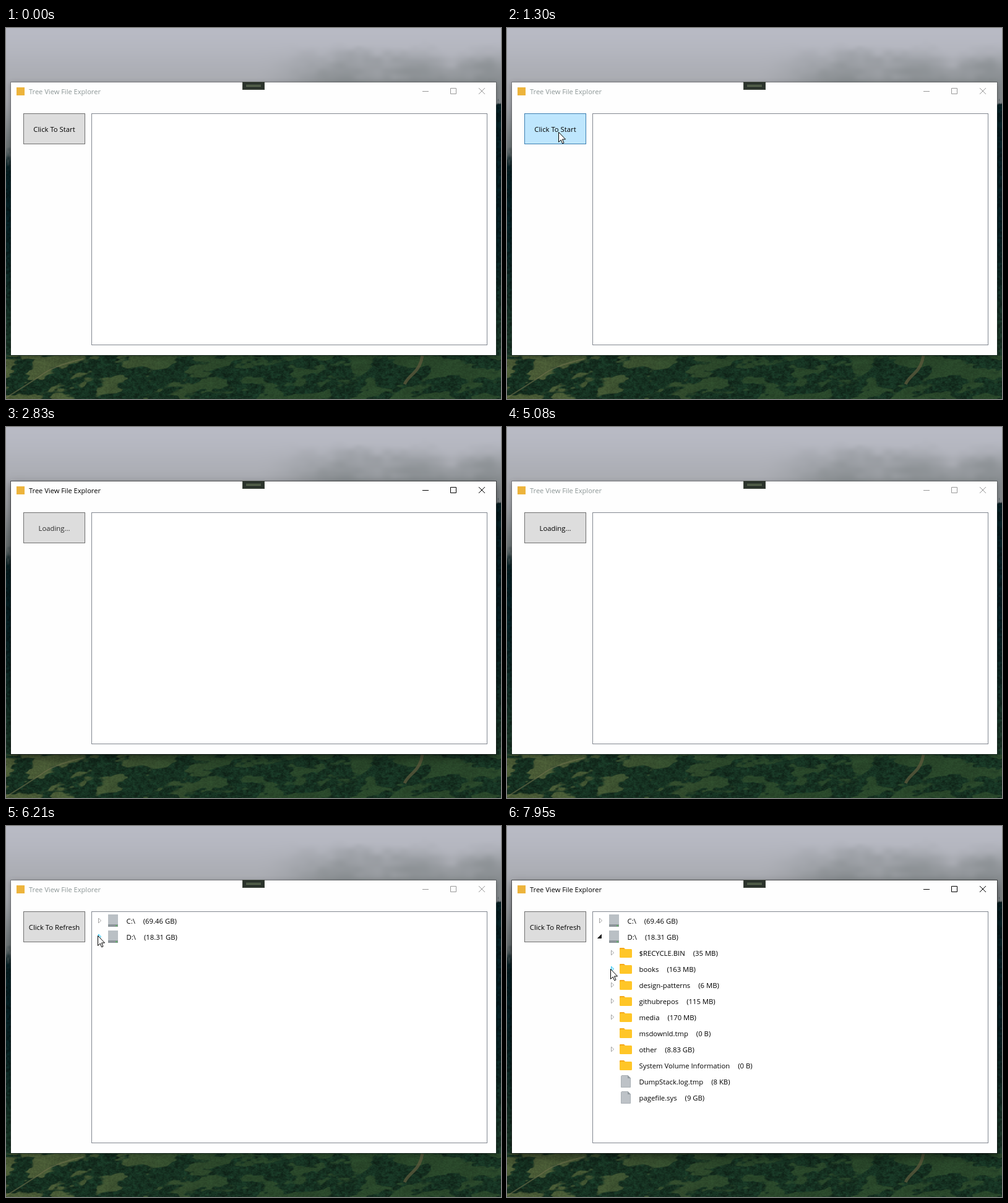
Animation, 800 px wide and 600 px high, one loop 8000 ms. Source, as an HTML page with a canvas:

```html
<!DOCTYPE html>
<html lang="en">
<head>
<meta charset="utf-8">
<title>Tree View File Explorer</title>
<style>
  html, body { margin: 0; width: 100%; height: 100%; overflow: hidden; }
  canvas, svg, #shadow { position: absolute; left: 0; top: 0; }
  #shadow { left: 8px; top: 88px; width: 784px; height: 441px; box-shadow: 0 2px 9px rgba(0,0,0,.3); }
  #shadow.active { box-shadow: 0 5px 14px rgba(0,0,0,.5); }
  text { font: 11.3px "Open Sans", "Noto Sans", sans-serif; fill: #000; }
  #title { font-size: 11.1px; }
  .toggle { fill: #fff; stroke: #a3a3a3; }
  .toggle.hover { fill: #ccecfb; stroke: #27c7f7; }
  .toggle.open { fill: #262626; stroke: #262626; }
  .toggle.open.hover { fill: #82dffb; stroke: #1cc4f7; }
</style>
</head>
<body>
<canvas width="800" height="600"></canvas>
<div id="shadow"></div>
<svg width="800" height="600">
  <rect x="8" y="88" width="784" height="441" fill="#fefefe"/>
  <rect id="frame" x="7.5" y="87.5" width="785" height="442" fill="none"/>
  <rect x="17" y="96" width="13" height="13" fill="#edb43c"/>
  <text id="title" x="37" y="107">Tree View File Explorer</text>
  <g id="controls" fill="none">
    <path d="M673 102.5H683M718.5 97.5H727.5V106.5H718.5Z"/>
    <path d="M764 97L774 107M774 97L764 107"/>
  </g>
  <rect x="382.5" y="87.5" width="35" height="12" fill="#2b332c" stroke="#3c423a"/>
  <path d="M388 92.5H412M388 94.5H412" stroke="#6f7f60"/>
  <rect id="button" x="28.5" y="138.5" width="99" height="49"/>
  <text id="label" x="78" y="168" text-anchor="middle"></text>
  <rect x="138.5" y="138.5" width="639" height="374" fill="#fff" stroke="#828790"/>
  <g id="drives"></g>
  <g id="files"></g>
  <path id="cursor" d="M.5 .5V16.5L4.2 13L6.6 18.8L9 17.8L6.5 12H11.5Z" fill="#fff" stroke="#000"/>
</svg>
<script>
const $ = id => document.getElementById(id);

// Landscape: misty sky, dark forest and a meadow with bushes, all from value noise
const mix = (a, b, u) => a + (b - a) * u;
const blend = (a, b, u) => a.map((v, i) => mix(v, b[i], u));
const smooth = u => u * u * (3 - 2 * u);
const ramp = (a, b, v) => smooth(Math.min(1, Math.max(0, (v - a) / (b - a))));

function hash(x, y) {
  const v = Math.sin(x * 127.1 + y * 311.7) * 43758.5453;
  return v - Math.floor(v);
}

function noise(x, y) {
  const i = Math.floor(x), j = Math.floor(y), u = smooth(x - i), v = smooth(y - j);
  return mix(mix(hash(i, j), hash(i + 1, j), u), mix(hash(i, j + 1), hash(i + 1, j + 1), u), v);
}

const cloud = (x, y) => .5 * noise(x, y) + .3 * noise(x * 2, y * 2) + .2 * noise(x * 4, y * 4);

function sky(x, y) {
  const base = blend([184, 186, 196], [169, 171, 177], ramp(0, 100, y));
  const low = blend(base, [104, 112, 113], ramp(95, 215, y));
  const mist = ramp(400, 560, x) * ramp(25, 100, y + 60 * (cloud(x / 60, y / 40) - .5));
  return blend(low, [112, 119, 120], mist * .6);
}

function forest(x, y) {
  const base = blend([5, 29, 33], [25, 52, 38], ramp(300, 529, y));
  return base.map(v => v * mix(.7, 1.3, noise(x / 3, y / 3)));
}

const clumps = [[60, 580], [165, 545], [440, 560], [610, 555], [710, 575]];

function meadow(x, y) {
  const grain = noise(x / 2, y / 1.5);
  const grass = blend([80, 98, 58], [44, 76, 45], ramp(0, 420, x))
    .map(v => v * mix(.75, 1.1, .5 * grain + .5 * cloud(x / 30, y / 12)));
  const bush = [20, 46, 31].map(v => v * mix(.6, 1.5, .5 * grain + .5 * noise(x / 5, y / 4)));
  const near = Math.max(...clumps.map(([cx, cy]) => 1 - Math.hypot((x - cx) / 32, (y - cy) / 18)));
  const density = cloud(x / 32 + y / 60, y / 15) + Math.max(0, near) * .4 + ramp(0, 300, x) * .07;
  return blend(grass, bush, ramp(.47, .57, density));
}

function landscape(x, y) {
  if (y > 529) return meadow(x, y);
  const treeTop = (x < 400 ? 210 : 122) + 12 * (noise(x / 3, y / 5) - .5);
  const fade = x < 400 ? 22 : 5;
  return blend(sky(x, y), forest(x, y), ramp(treeTop - fade, treeTop + fade, y));
}

function drawLandscape() {
  const ctx = document.querySelector('canvas').getContext('2d');
  const image = ctx.createImageData(800, 600);
  for (let y = 0; y < 600; y++) {
    for (let x = 0; x < 800; x++) {
      const hidden = x > 8 && x < 791 && y > 88 && y < 528;
      if (!hidden) image.data.set([...landscape(x, y), 255], (y * 800 + x) * 4);
    }
  }
  ctx.putImageData(image, 0, 0);
  const trail = (path, color, width) => {
    ctx.strokeStyle = color;
    ctx.lineWidth = width;
    ctx.stroke(new Path2D(path));
  };
  trail('M0 598Q45 570 62 558T125 535', 'rgba(112,114,78,.6)', 2);
  trail('M673 530Q670 548 659 558T644 576', 'rgba(94,90,60,.75)', 5);
}

// Tree
const drives = [['C:\\', '69.46 GB'], ['D:\\', '18.31 GB']];
const files = [
  ['$RECYCLE.BIN', '35 MB'], ['books', '163 MB'], ['design-patterns', '6 MB'], ['githubrepos', '115 MB'],
  ['media', '170 MB'], ['msdownld.tmp', '0 B'], ['other', '8.83 GB'], ['System Volume Information', '0 B'],
  ['DumpStack.log.tmp', '8 KB', 'file'], ['pagefile.sys', '9 GB', 'file']];

const icons = {
  drive: `<path d="M165 -10H181V10H165Z" fill="#bac0c5"/><path d="M165 6H181V10H165Z" fill="#8d959a"/>
    <path d="M177 7.5H180V9H177Z" fill="#58b65b"/>`,
  folder: `<path d="M163 3V-7Q163 -8 164 -8H170L172 -6H182V3Z" fill="#f5a81c"/>
    <rect x="163" y="-6" width="20" height="14" rx="1.5" fill="#ffc627"/>`,
  file: `<path d="M166.5 -9.5H176L180.5 -5V9.5H165.5V-8.5Z" fill="#bdc2c7" stroke="#aab0b5"/>
    <path d="M176 -10V-5H181Z" fill="#929a9f"/>`
};
const collapsed = 'M149.5 -4V4L153.5 0Z', expanded = 'M152.5 -3.5V2.5H146.5Z';

const row = (indent, top, kind) => ([name, size, icon = kind], i) => {
  const toggle = icon !== 'file' && size !== '0 B';
  return `<g transform="translate(${indent} ${top + i * 26})">
    ${toggle ? `<path class="toggle" d="${collapsed}"/>` : ''}${icons[icon]}
    <text x="194.5" y="5">${name}<tspan dx="13">(${size})</tspan></text>
  </g>`;
};

drawLandscape();
$('drives').innerHTML = drives.map(row(0, 153, 'drive')).join('');
$('files').innerHTML = files.map(row(19, 205, 'folder')).join('');
const driveToggle = $('drives').querySelectorAll('.toggle')[1];
const bookToggle = $('files').querySelectorAll('.toggle')[1];

// Motion: the pointer advances in even ticks along each path
const TICK = 77;
const easeOut = u => 1 - (1 - u) ** 2;
const easeIn = u => u ** 1.5;
const onButton = [83, 168], onDrive = [148, 177], onBooks = [167, 231];

function glide(t, start, ticks, from, to, ease) {
  const u = ease(Math.min(1, Math.floor((t - start) / TICK + .05) / ticks));
  return from.map((a, i) => Math.round(mix(a, to[i], u)));
}

function pointer(t) {
  if (t < 440 || t >= 2830 && t < 5670) return null;
  if (t < 2463) return glide(t, 440, 10, [666, 584], onButton, easeOut);
  if (t < 2830) return glide(t, 2463, 4, onButton, [507, 585], easeIn);
  if (t < 7333) return glide(t, 5670, 7, [325, 487], onDrive, easeOut);
  return glide(t, 7333, 8, onDrive, onBooks, smooth);
}

function set(id, attrs) {
  for (const key in attrs) $(id).setAttribute(key, attrs[key]);
}
const show = (id, on) => $(id).style.display = on ? '' : 'none';

function draw(t) {
  const p = pointer(t);
  const near = (x, y) => !!p && Math.abs(p[0] - x) < 8 && Math.abs(p[1] - y) < 8;
  const active = t >= 2150 && t < 5080 || t >= 6530;
  const over = p && p[0] >= 28 && p[0] < 128 && p[1] >= 138 && p[1] < 188;
  const pressed = t >= 2150 && t < 2230;
  const loading = t >= 2230 && t < 5160;
  const open = t >= 6590;

  $('shadow').className = active ? 'active' : '';
  set('frame', { stroke: active ? 'rgba(0,0,0,.5)' : 'rgba(0,0,0,.25)' });
  $('title').style.fill = active ? '#000' : '#8c9696';
  set('controls', { stroke: active ? '#000' : '#999' });
  set('button', {
    fill: pressed ? '#c4e5f6' : over ? '#bee6fd' : '#ddd',
    stroke: pressed ? '#2c628b' : over ? '#3c7fb1' : '#707070'
  });
  $('label').textContent = loading ? 'Loading...' : t < 2230 ? 'Click To Start' : 'Click To Refresh';
  $('label').style.fill = loading && active ? '#2b2b2b' : '#000';

  show('drives', t >= 5160);
  show('files', open);
  driveToggle.setAttribute('d', open ? expanded : collapsed);
  driveToggle.classList.toggle('open', open);
  driveToggle.classList.toggle('hover', near(151, 180));
  bookToggle.classList.toggle('hover', near(170, 232));

  show('cursor', p);
  if (p) set('cursor', { transform: `translate(${p})` });
}

function loop() {
  draw(performance.now() % 8000);
  requestAnimationFrame(loop);
}
loop();
</script>
</body>
</html>
```
